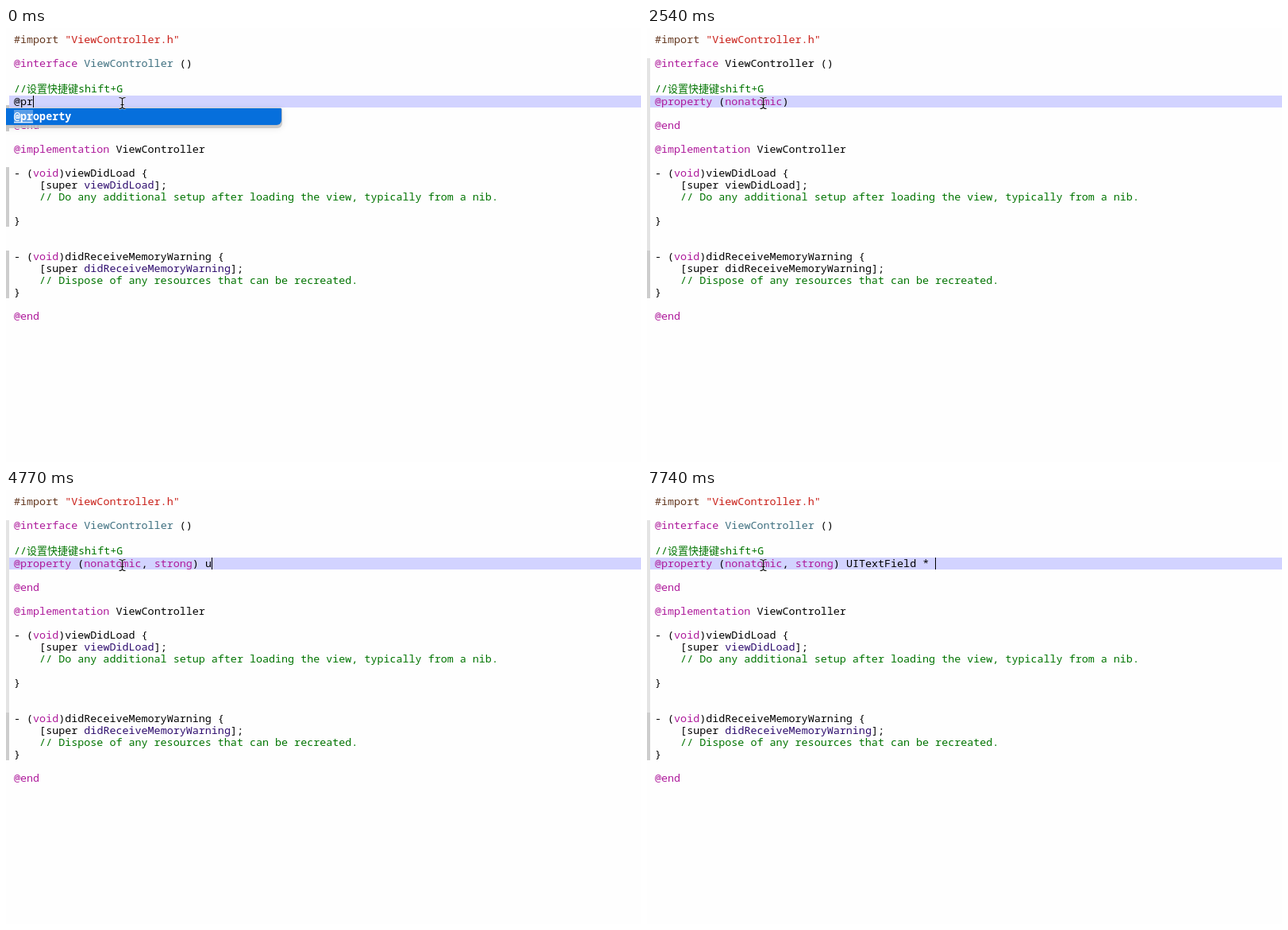
Recreate the animation shown at these times as an HTML page with a canvas. Size 800x546 px, loop 8 s.

```html
<!DOCTYPE html>
<html lang="en">
<head>
<meta charset="utf-8">
<title>Code completion</title>
<style>
  html, body { margin: 0; width: 100%; height: 100%; overflow: hidden; background: #fff; }
  canvas { display: block; width: 800px; height: 546px; }
</style>
</head>
<body>
<canvas id="stage" width="800" height="546"></canvas>
<script>
const ctx = document.getElementById('stage').getContext('2d');
const LOOP = 8000, LEFT = 10, ADV = 8.03;
const MONO = '13.38px "Noto Sans Mono", "DejaVu Sans Mono", monospace';
const CJK = '13px "Noto Sans CJK SC", "Noto Sans CJK", sans-serif';

const INK = {
  plain: '#000', key: '#ae1a9b', type: '#3f7080', call: '#2e0d6e',
  note: '#007400', str: '#c91f18', pre: '#643820'
};

const ATTRS = ['strong', 'setter=method', 'assign', 'null_resettable',
  'null_unspecified', 'unsafe_unretained', 'nonatomic', 'nonnull'];
const TYPES = ['Field', 'View', 'Range', 'Position', 'Checker', 'InputMode', 'FieldDelegate',
  'ViewDelegate', 'InputDelegate', 'InputTraits', 'SelectionRect'].map(s => 'UIText' + s);

// Each step: start, typed line, caret column (-1 = hidden), completion list, typed word
const ATTR_LINE = '@property (nonatomic, strong) ';
const STEPS = [
  [0, '@pr', 3, ['@property'], '@pr'],
  [300, '@property', -1],
  [450, '@property', 9],
  [900, '@property ', 10],
  [1350, '@property ()', 11],
  [1940, '@property (n)', 12, ATTRS.slice(6), 'n'],
  [2090, '@property (no)', 13, ATTRS.slice(6), 'no'],
  [2540, '@property (nonatomic)', -1],
  [2690, '@property (nonatomic)', 20],
  [2980, '@property (nonatomic,)', 21],
  [3130, '@property (nonatomic, )', 22],
  [3430, '@property (nonatomic, s)', 23, ATTRS.slice(0, 6), 's'],
  [3570, '@property (nonatomic, st)', 24, ATTRS.slice(0, 6), 'st'],
  [3870, '@property (nonatomic, strong)', -1],
  [4170, '@property (nonatomic, strong)', 28],
  [4320, '@property (nonatomic, strong)', 29],
  [4470, ATTR_LINE, 30],
  [4770, ATTR_LINE + 'u', 31],
  [4910, ATTR_LINE + 'ui', 32, TYPES, 'ui'],
  [5060, ATTR_LINE + 'uit', 33, TYPES, 'uit'],
  [5210, ATTR_LINE + 'uite', 34, TYPES, 'uite'],
  [5650, ATTR_LINE + 'UITextField ', -1],
  [5950, ATTR_LINE + 'UITextField ', 42],
  [6550, ATTR_LINE + 'UITextField ', -1],
  [6850, ATTR_LINE + 'UITextField *', 43],
  [7440, ATTR_LINE + 'UITextField * ', -1],
  [7740, ATTR_LINE + 'UITextField * ', 44]
];

const between = (t, a, b) => t >= a && t < b;
const colX = col => LEFT + col * ADV;

function box(x, y, w, h, color) {
  ctx.fillStyle = color;
  ctx.fillRect(x, y, w, h);
}

function put(str, x, y, color, font = MONO) {
  ctx.font = font;
  ctx.fillStyle = color;
  ctx.fillText(str, x, y);
}

// Parts alternate between an ink name and its text
function line(y, col, ...parts) {
  for (let i = 0; i < parts.length; i += 2) {
    put(parts[i + 1], colX(col), y, INK[parts[i]]);
    col += parts[i + 1].length;
  }
}

function gutter(t) {
  const dark = '#cdcdcd';
  if (t < 300) {
    box(0, 97, 4, 33, dark);
    box(0, 175, 4, 75, dark);
  } else {
    box(0, 38, 4, 242, '#e4e4e4');
  }
  box(0, 280, 4, 60, dark);
}

function code(t) {
  const type = between(t, 1500, 3130) || between(t, 3870, 4320) ? 'plain' : 'type';
  const call = between(t, 1050, 3130) ? 'plain' : 'call';
  line(19, 0, 'pre', '#import ', 'str', '"ViewController.h"');
  line(49, 0, 'key', '@interface ', type, 'ViewController', 'plain', ' ()');
  line(81, 0, 'note', '//');
  put('设置快捷键', colX(2), 81, INK.note, CJK);
  put('shift+G', colX(2) + 65, 81, INK.note);
  line(127, 0, 'key', '@end');
  line(157, 0, 'key', '@implementation', 'plain', ' ViewController');
  line(187, 0, 'plain', '- (', 'key', 'void', 'plain', ')viewDidLoad {');
  line(202, 4, 'plain', '[super ', call, 'viewDidLoad', 'plain', '];');
  line(217, 4, 'note', '// Do any additional setup after loading the view, typically from a nib.');
  line(247, 0, 'plain', '}');
  line(292, 0, 'plain', '- (', 'key', 'void', 'plain', ')didReceiveMemoryWarning {');
  line(307, 4, 'plain', '[super ', call, 'didReceiveMemoryWarning', 'plain', '];');
  line(322, 4, 'note', '// Dispose of any resources that can be recreated.');
  line(337, 0, 'plain', '}');
  line(367, 0, 'key', '@end');
}

function typedLine(text, caret) {
  let col = 0;
  for (const part of text.split(/(@property|nonatomic|strong)/)) {
    line(97, col, /^(@property|nonatomic|strong)$/.test(part) ? 'key' : 'plain', part);
    col += part.length;
  }
  if (caret >= 0) box(Math.round(colX(caret)), 85, 1, 15, '#000');
}

// Columns of the first in-order match, or null when a letter is missing
function match(item, word) {
  const hits = [];
  let from = 0;
  for (const ch of word) {
    const at = item.toLowerCase().indexOf(ch, from);
    if (at < 0) return null;
    hits.push(at);
    from = at + 1;
  }
  return hits;
}

function panel(x, y, w, h) {
  ctx.beginPath();
  ctx.roundRect(x, y, w, h, [1, 1, 6, 6]);
}

function popup(list, word, col) {
  const rows = list.filter(item => match(item, word));
  const textX = colX(col), x = Math.round(textX - 39.5), w = 376;
  const h = rows.length * 21 + (rows.length > 1 ? 1 : 0);
  ctx.save();
  ctx.shadowColor = 'rgba(0,0,0,.12)';
  ctx.shadowBlur = 8;
  panel(x + 1, 102, w, h + 3);
  ctx.fillStyle = 'rgba(196,196,196,.85)';
  ctx.fill();
  ctx.restore();

  ctx.save();
  panel(x, 101, w, h);
  ctx.fillStyle = '#fff';
  ctx.fill();
  ctx.strokeStyle = '#b4b4b4';
  ctx.lineWidth = 1;
  ctx.stroke();
  ctx.clip();
  box(x, 101, w, 21, '#066fdc');
  rows.forEach((item, i) => {
    const y = 116 + i * 21, first = i === 0;
    for (const hit of match(item, word)) {
      const hx = textX + hit * ADV;
      box(hx, y - 13, ADV, 16, first ? '#5a9ee8' : '#fdf3c4');
      box(hx, y + 2, ADV, 1.5, first ? '#d6e8fb' : '#f3d32c');
    }
    put(item, textX, y, first ? '#fff' : '#000', (first ? 'bold ' : '') + MONO);
  });
  ctx.restore();
}

function pointer() {
  ctx.beginPath();
  ctx.moveTo(142.5, 87.5);
  ctx.quadraticCurveTo(146.5, 87.5, 146.5, 90);
  ctx.quadraticCurveTo(146.5, 87.5, 150.5, 87.5);
  ctx.moveTo(146.5, 90);
  ctx.lineTo(146.5, 99);
  ctx.moveTo(142.5, 101.5);
  ctx.quadraticCurveTo(146.5, 101.5, 146.5, 99);
  ctx.quadraticCurveTo(146.5, 101.5, 150.5, 101.5);
  ctx.moveTo(144.5, 96.5);
  ctx.lineTo(148.5, 96.5);
  ctx.strokeStyle = 'rgba(255,255,255,.6)';
  ctx.lineWidth = 2.5;
  ctx.stroke();
  ctx.strokeStyle = '#111';
  ctx.lineWidth = 1.2;
  ctx.stroke();
}

function draw(now) {
  const t = now % LOOP;
  const [, text, caret, list, word] = STEPS.findLast(step => step[0] <= t) || STEPS[0];
  box(0, 0, 800, 546, '#fefefe');
  gutter(t);
  box(4, 85, 796, 15, '#d2d3ff');
  code(t);
  typedLine(text, caret);
  if (list) popup(list, word, caret - word.length);
  pointer();
  requestAnimationFrame(draw);
}
requestAnimationFrame(draw);
</script>
</body>
</html>
```
